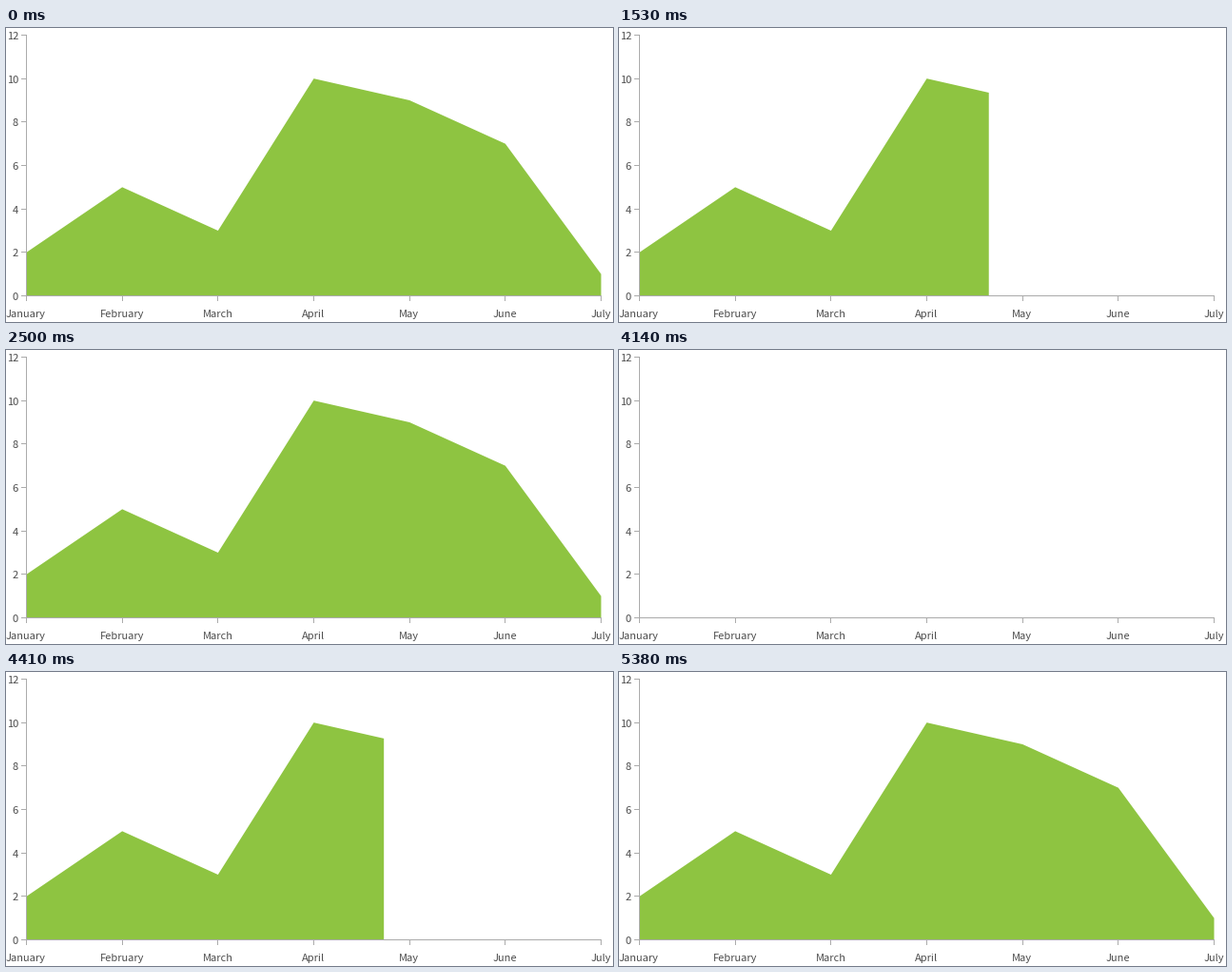
A matplotlib script that plays this animation: 638x309 px, repeating every 5.84 s.

```python
import numpy as np
import matplotlib.pyplot as plt
from matplotlib.animation import FuncAnimation
from matplotlib.patches import Polygon, Rectangle

W, H, DPI = 638, 309, 64
LOOP, TICK = 5840, 10

LEFT, RIGHT, TOP, BASE = 21.5, 625.5, 7.5, 281.5
MONTHS = ["January", "February", "March", "April", "May", "June", "July"]
VALUES = [2, 5, 3, 10, 9, 7, 1]
Y_MAX = 12

GREEN, GREY, INK = "#8ec441", "#ababab", "#4d4d4d"

# Sweep reveals: start ms, step phase ms, lead in steps, first visible step
RUNS = [(1230, 0, -0.67, 2), (4140, 3, 0.65, 1)]
STEP, EASE_STEPS, LAST_STEP = 30.16, 44.7, 41

fig = plt.figure(figsize=(W / DPI, H / DPI), dpi=DPI, facecolor="white")
ax = fig.add_axes([0, 0, 1, 1])
ax.set_xlim(0, W)
ax.set_ylim(H, 0)
ax.axis("off")


def y_pos(value):
    return BASE - (BASE - TOP) * value / Y_MAX


def bar(x, y, w, h):
    ax.add_patch(Rectangle((x, y), w, h, fc=GREY, lw=0, aa=False, zorder=3))


def label(x, y, text, align):
    ax.text(x, y, text, ha=align, va="baseline", color=INK,
            family="Noto Sans CJK JP", size=11.1 * 72 / DPI, zorder=4)


xs = np.linspace(LEFT, RIGHT, len(VALUES))
ys = np.array([y_pos(v) for v in VALUES])

bar(21, 7, 1, 275)
bar(21, 281, 605, 1)
for v in range(0, Y_MAX + 1, 2):
    y = int(y_pos(v))
    bar(16, y, 5, 1)
    label(13, y + 5, str(v), "right")
for x, month in zip(xs, MONTHS):
    bar(int(x), 282, 1, 5)
    label(x - 0.5, 304, month, "center")

area = Polygon([(LEFT, BASE)] * 3, closed=True, fc=GREEN, lw=0, snap=False, zorder=2)
ax.add_patch(area)


def reveal(t):
    """Share of the plot width uncovered at time t (ms)."""
    for start, phase, lead, first in reversed(RUNS):
        if t >= start:
            k = int((t - start + 5 - phase) // STEP)
            if k < first:
                return 0.0
            if k >= LAST_STEP:
                return 1.0
            return 1 - (1 - (k + lead) / EASE_STEPS) ** 4
    return 1.0


def update(i):
    share = reveal(i * TICK)
    area.set_visible(share > 0)
    edge = LEFT + (RIGHT - LEFT) * share
    shown = xs < edge
    top = list(zip(xs[shown], ys[shown])) + [(edge, np.interp(edge, xs, ys))]
    area.set_xy([(LEFT, BASE)] + top + [(edge, BASE)])
    return [area]


anim = FuncAnimation(fig, update, frames=LOOP // TICK, interval=TICK,
                     repeat=True, repeat_delay=0, cache_frame_data=False)
plt.show()
```
